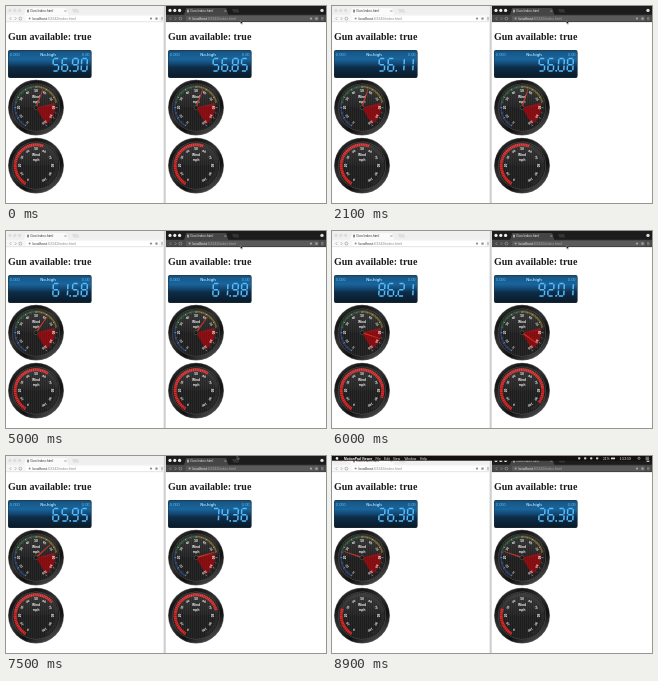
Animation, 320 px wide and 197 px high, one loop 9.1 s. Source, as an HTML page:

```html
<!DOCTYPE html>
<html lang="en">
<head>
<meta charset="utf-8">
<title>Gauges</title>
<style>
  html, body { margin: 0; width: 100%; height: 100%; overflow: hidden; background: #fff; }
  svg { display: block; width: 100vw; height: 100vh; }
  text { font-family: "Liberation Sans", Arial, sans-serif; }
  .head { font: bold 10px "Liberation Serif", Times, serif; }
  .mid { text-anchor: middle; }
  .bold { font-weight: bold; }
</style>
</head>
<body>
<svg id="stage" viewBox="0 0 320 197" preserveAspectRatio="none">
  <defs>
    <linearGradient id="lcd" x2="0" y2="1">
      <stop offset="0" stop-color="#1c4c6e"/>
      <stop offset=".08" stop-color="#17588a"/>
      <stop offset=".32" stop-color="#1a659c"/>
      <stop offset=".5" stop-color="#124670"/>
      <stop offset=".62" stop-color="#0d2d48"/>
      <stop offset="1" stop-color="#0a1a28"/>
    </linearGradient>
    <linearGradient id="rim" x2=".7" y2="1">
      <stop offset="0" stop-color="#4c4c4c"/>
      <stop offset=".25" stop-color="#141414"/>
      <stop offset=".5" stop-color="#303030"/>
      <stop offset=".75" stop-color="#101010"/>
      <stop offset="1" stop-color="#484848"/>
    </linearGradient>
    <linearGradient id="glass" x2="0" y2="1">
      <stop offset="0" stop-color="#fff" stop-opacity=".1"/>
      <stop offset="1" stop-color="#fff" stop-opacity=".02"/>
    </linearGradient>
    <pattern id="carbon" width="2" height="2" patternUnits="userSpaceOnUse">
      <path d="M0 0h2v2h-2z" fill="#272727"/>
      <path d="M0 0h1v2h-1z" fill="#1d1d1d"/>
    </pattern>
    <clipPath id="half"><path d="M0 0h160v197h-160z"/></clipPath>
  </defs>
</svg>
<script>
const LOOP = 9100, STEP = 100;
const START = 210, SWEEP = 300;
const stage = document.getElementById('stage');

function el(parent, name, attrs, text) {
  const node = document.createElementNS('http://www.w3.org/2000/svg', name);
  for (const key in attrs) node.setAttribute(key, attrs[key]);
  if (text !== undefined) node.textContent = text;
  parent.appendChild(node);
  return node;
}
const group = (p, x, y) => el(p, 'g', { transform: `translate(${x} ${y})` });
const rect = (p, x, y, width, height, fill, rx = 0) =>
  el(p, 'rect', { x, y, width, height, fill, rx });
const dot = (p, cx, cy, r, fill) => el(p, 'circle', { cx, cy, r, fill });
const line = (p, d, stroke, width = 0.6) =>
  el(p, 'path', { d, stroke, 'stroke-width': width, fill: 'none' });
const label = (p, x, y, size, fill, text, more) =>
  el(p, 'text', { x, y, 'font-size': size, fill, ...more }, text);

// Compass angle in degrees, zero at the top
function polar(r, deg) {
  const a = deg * Math.PI / 180;
  return [(r * Math.sin(a)).toFixed(2), (-r * Math.cos(a)).toFixed(2)];
}
const angle = value => START + value / 100 * SWEEP;
function arc(r, from, to) {
  const big = to - from > 180 ? 1 : 0;
  return `M${polar(r, from)}A${r} ${r} 0 ${big} 1 ${polar(r, to)}`;
}

function browser(p, dark) {
  const c = dark
    ? { strip: '#1c1c1c', tab: '#454545', bar: '#4a4a4a', field: '#5a5a5a', ink: '#e8e8e8', soft: '#a8a8a8', light: '#ececec', edge: '#333' }
    : { strip: '#efefef', tab: '#fafafa', bar: '#f7f7f7', field: '#fff', ink: '#333', soft: '#8c8c8c', light: '#dcdcdc', edge: '#cfcfcf' };
  rect(p, 0, 0, 160, 9, c.strip);
  for (const x of [4, 8.8, 13.6]) dot(p, x, 4.4, 1.6, c.light);
  el(p, 'path', { d: 'M18 9l2.2-7h40l2.2 7z', fill: c.tab });
  el(p, 'path', { d: 'M66 3h6l1.4 3.6h-6z', fill: dark ? '#343434' : '#dedede' });
  rect(p, 21, 3.6, 2, 2.8, c.soft);
  label(p, 24.2, 6.1, 3.4, c.ink, 'Gun Index.html');
  line(p, 'M58.4 4l2 2m0-2l-2 2', c.soft, 0.5);
  rect(p, 0, 8.8, 160, 7.2, c.bar);
  line(p, 'M5.2 11.2l-1.4 1.4 1.4 1.4M8.8 11.2l1.4 1.4-1.4 1.4', c.soft);
  el(p, 'circle', { cx: 14.4, cy: 12.6, r: 1.4, fill: 'none', stroke: c.soft, 'stroke-width': 0.6 });
  rect(p, 20, 10, 133, 5.2, c.field, 0.8);
  dot(p, 23.6, 12.6, 1, c.soft);
  const url = label(p, 26.4, 13.9, 3.7, c.ink, 'localhost');
  el(url, 'tspan', { fill: c.soft }, ':63342/index.html');
  dot(p, 145, 12.6, 1.1, c.soft);
  rect(p, 149.4, 11.5, 2.2, 2.2, c.soft);
  line(p, 'M155 11.4h2.6m-2.6 1.2h2.6m-2.6 1.2h2.6', c.soft, 0.5);
  rect(p, 0, 15.6, 160, 0.5, c.edge);
  if (dark) dot(p, 156, 4.4, 1.7, '#ddd');
}

// Segments a to g on a 5.6 by 12.4 cell
const SEGMENTS = ['M.7 0h4.2', 'M5.6 .7v4.9', 'M5.6 6.8v4.9', 'M.7 12.4h4.2', 'M0 6.8v4.9', 'M0 .7v4.9', 'M.7 6.2h4.2'];
const LIT = ['abcdef', 'bc', 'abged', 'abgcd', 'fgbc', 'afgcd', 'afgedc', 'abc', 'abcdefg', 'abcdfg'];
const digitPath = n => [...LIT[n]].map(s => SEGMENTS[s.charCodeAt(0) - 97]).join('');

function lcd(p) {
  rect(p, 2, 44, 83.6, 28, '#23323d', 2);
  rect(p, 2.5, 44.5, 82.6, 27, 'url(#lcd)', 1.6);
  const ink = '#5cc0fa';
  label(p, 3.8, 50.2, 4, ink, '0.000');
  label(p, 83.6, 50.2, 4, ink, '0.00', { 'text-anchor': 'end' });
  label(p, 42, 50.3, 4.2, '#a4dcff', 'No.high', { class: 'mid bold' });
  const digits = [47.4, 56.4, 66.8, 75.8].map(x => {
    const d = line(p, '', '#55bcff', 1.5);
    d.setAttribute('transform', `translate(${x} 52.6) skewX(-3)`);
    return d;
  });
  rect(p, 63.4, 64, 1.6, 1.7, '#55bcff');
  return value => {
    const chars = value.toFixed(2).replace('.', '').padStart(4, '0');
    digits.forEach((d, i) => d.setAttribute('d', digitPath(+chars[i])));
  };
}

function dial(p, y) {
  const g = group(p, 30, y);
  dot(g, 0, 0, 27.9, '#6c6c6c');
  dot(g, 0, 0, 27.4, 'url(#rim)');
  dot(g, 0, 0, 24, '#4c4c4c');
  dot(g, 0, 0, 23.5, 'url(#carbon)');
  return g;
}

function scale(g, rText) {
  for (let v = 0; v <= 100; v += 10) {
    const a = angle(v), [x, y] = polar(rText, a);
    label(g, 0, 1.1, 3.2, '#fff', v, { class: 'mid bold', transform: `translate(${x} ${y}) rotate(${a})` });
  }
  label(g, 0, -9.2, 3.3, '#f4f4f4', 'Wind', { class: 'mid bold' });
  label(g, 0, -4.2, 3.2, '#f4f4f4', 'mph', { class: 'mid bold' });
}

function ticks(g, r) {
  for (let v = 0; v <= 100; v += 5) {
    const a = angle(v);
    line(g, `M${polar(r, a)}L${polar(r - 1.8, a)}`, '#d8d8d8', v % 10 ? 0.25 : 0.5);
  }
}

const shine = g => el(g, 'path', { d: 'M-22.6-3A22.8 22.8 0 0 1 22.6-3Q0 4-22.6-3z', fill: 'url(#glass)' });

function needleDial(p) {
  const g = dial(p, 101.6);
  ['50,110,220', '20,150,60', '220,180,20'].forEach((rgb, i) =>
    line(g, arc(21, angle(i * 25), angle(i * 25 + 25)), `rgba(${rgb},.36)`, 1.8));
  el(g, 'path', { d: arc(19.2, angle(75), angle(100)) + 'L0 0z', fill: 'rgba(215,0,8,.55)' });
  ticks(g, 21.4);
  scale(g, 17.2);
  const needle = el(g, 'path', { d: 'M-.8 2L-.3-19.5h.6L.8 2z', fill: '#d0301c' });
  dot(g, 0, 0, 2.3, '#4a4a4a');
  dot(g, 0, 0, 1.7, '#151515');
  shine(g);
  return value => needle.setAttribute('transform', `rotate(${angle(value)})`);
}

function barDial(p) {
  const g = dial(p, 159.6);
  const leds = (to, color) => {
    const path = line(g, arc(20.8, START, to), color, 3);
    path.setAttribute('stroke-dasharray', '1.4 .415');
    return path;
  };
  leds(START + SWEEP, '#2c2c2c');
  const bar = leds(START + 5, '#ee2424');
  scale(g, 16.4);
  shine(g);
  return value => {
    const lit = Math.max(1, Math.round(value / 100 * SWEEP / 5));
    bar.setAttribute('d', arc(20.8, START, START + lit * 5));
  };
}

function panel(x, dark) {
  const g = el(group(stage, x, 0), 'g', { 'clip-path': 'url(#half)' });
  rect(g, 0, 0, 160, 197, '#fff');
  browser(g, dark);
  el(g, 'text', { x: 2, y: 33.6, class: 'head', fill: '#1c1c1c' }, 'Gun available: true');
  const parts = [lcd(g), needleDial(g), barDial(g)];
  return value => parts.forEach(show => show(value));
}

const left = panel(0, false);
rect(stage, 157, 0, 1.2, 197, '#ececec');
rect(stage, 158.2, 0, 1.4, 197, '#c4c4c4');
const right = panel(160, true);

const cursor = el(stage, 'path', {
  d: 'M0 0v3.2l.8-.7.6 1.3.6-.3-.6-1.2h1z', fill: '#000', stroke: '#ddd', 'stroke-width': 0.3
});

const menu = group(stage, 0, -6);
rect(menu, 0, 0, 320, 4.7, '#15100f');
dot(menu, 5, 2.4, 1.3, '#eee');
label(menu, 12, 3.6, 3.3, '#fff', 'MotionPad Viewer', { class: 'bold' });
[['File', 43.5], ['Edit', 52], ['View', 61], ['Window', 72.5], ['Help', 88]]
  .forEach(([word, x]) => label(menu, x, 3.6, 3.3, '#eee', word));
for (const x of [246, 252, 258, 264]) rect(menu, x, 1.2, 2.4, 2.2, '#ccc', 0.8);
label(menu, 271, 3.6, 3.3, '#eee', '21%');
rect(menu, 279, 1.4, 4, 1.9, '#ddd', 0.3);
label(menu, 287.5, 3.6, 3.4, '#eee', '1:53:59');
el(menu, 'circle', { cx: 307, cy: 2.3, r: 1.1, fill: 'none', stroke: '#eee', 'stroke-width': 0.5 });
line(menu, 'M313.6 1.2h3.4m-3.4 1.2h3.4m-3.4 1.2h3.4', '#eee', 0.5);

// Target value, duration, start time on the left and on the right
const MOVES = [
  [56.05, 1400, -150, -281],
  [61.58, 1250, 2008, 2035],
  [92.91, 1250, 5158.7, 4900],
  [26.38, 1000, 7049.87, 7126.62]
];
const progress = (t, from, time) => Math.min(1, Math.max(0, (t - from) / time));
const ease = p => p < 0.5 ? 2 * p * p : 1 - 2 * (1 - p) ** 2;

function valueAt(t, side) {
  let value = 56.92;
  for (const [target, time, ...starts] of MOVES) {
    value += (target - value) * ease(progress(t, starts[side], time));
  }
  return value;
}

function draw(t) {
  left(valueAt(t, 0));
  right(valueAt(t, 1));
  const lift = ease(progress(t, 7050, 400));
  const leave = progress(t, 8000, 300);
  cursor.setAttribute('transform', `translate(${234.5 - 3.5 * lift} ${14.6 - 14.6 * lift - 5 * leave})`);
  menu.setAttribute('transform', `translate(0 ${-6 + 6 * ease(progress(t, 8400, 400))})`);
}

const began = performance.now();
function frame() {
  const t = (performance.now() - began) % LOOP;
  draw(Math.floor(t / STEP) * STEP);
  requestAnimationFrame(frame);
}
draw(0);
requestAnimationFrame(frame);
</script>
</body>
</html>
```
